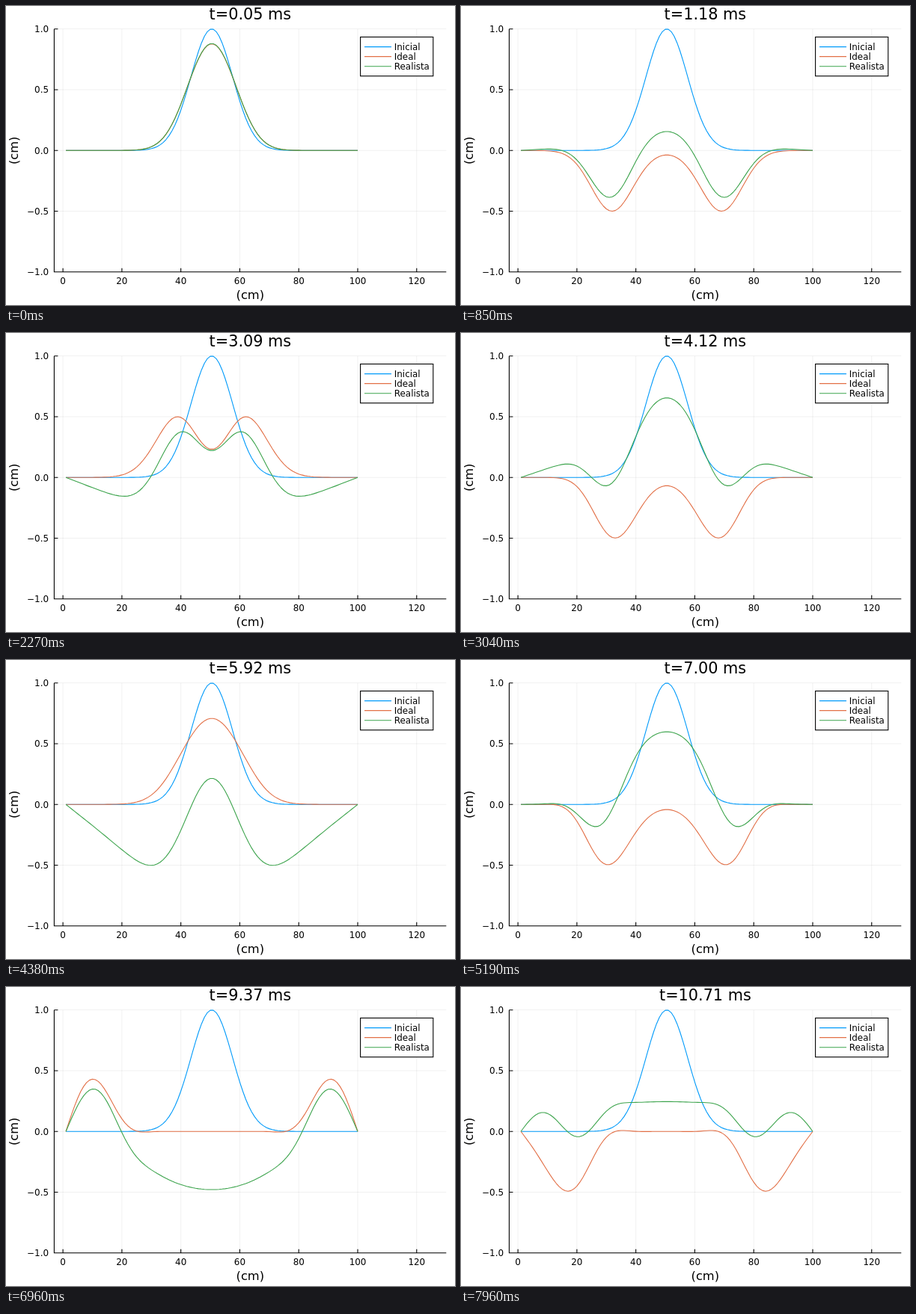
An HTML page for the animation above (8000 ms loop, 600 px wide and 400 px high).

```html
<!DOCTYPE html>
<html lang="es">
<head>
<meta charset="utf-8">
<title>Cuerda vibrante</title>
<style>
html, body { margin: 0; width: 100%; height: 100%; overflow: hidden; background: #fff; }
svg { display: block; width: 600px; height: 400px; }
text { font: 11.9px "DejaVu Sans", sans-serif; fill: #000; }
.title { font-size: 20.8px; }
.label { font-size: 16.3px; }
.mid { text-anchor: middle; }
.end { text-anchor: end; }
path, rect { fill: none; stroke: #000; stroke-width: 1.1; }
#grid { stroke-opacity: .1; stroke-width: .6; }
.box { fill: #fff; }
.curve { stroke-linejoin: round; }
</style>
</head>
<body>
<svg id="plot" viewBox="0 0 600 400"></svg>
<script>
const LOOP = 8000, FRAMES = 208, FRAME_RATE = 0.026;
const POINTS = 100, STEPS = 14, COURANT = 0.25, LOSS = 2.5e-5;
const STEP_MS = 10 / (4 * 680);
const LEFT = 64.4, RIGHT = 588.3, TOP = 30.7, BOTTOM = 355.8;
const SERIES = [['Inicial', '#009afa'], ['Ideal', '#e26f46'], ['Realista', '#3da44d']];

const plot = document.getElementById('plot');
const px = x => 76.1 + x * 3.939;
const py = y => 193.25 - y * 162.55;

function add(tag, attrs, content = '') {
  const node = document.createElementNS('http://www.w3.org/2000/svg', tag);
  for (const key in attrs) node.setAttribute(key, attrs[key]);
  node.textContent = content;
  return plot.appendChild(node);
}

function drawAxes() {
  let grid = '', axes = `M${LEFT} ${TOP}V${BOTTOM}H${RIGHT}`;
  for (let x = 0; x <= 120; x += 20) {
    grid += `M${px(x)} ${TOP}V${BOTTOM}`;
    axes += `M${px(x)} ${BOTTOM}v-5`;
    add('text', { x: px(x), y: 371.7, class: 'mid' }, x);
  }
  for (let y = -1; y <= 1; y += 0.5) {
    grid += `M${LEFT} ${py(y)}H${RIGHT}`;
    axes += `M${LEFT} ${py(y)}h5`;
    add('text', { x: 57, y: py(y) + 4.3, class: 'end' }, y.toFixed(1).replace('-', '\u2212'));
  }
  add('path', { id: 'grid', d: grid });
  add('path', { d: axes });
  add('text', { x: 326.3, y: 392, class: 'label mid' }, '(cm)');
  add('text', { transform: 'translate(16 193.3) rotate(-90)', class: 'label mid' }, '(cm)');
}

function drawLegend() {
  add('rect', { x: 473.6, y: 41.5, width: 97.2, height: 52.2, class: 'box' });
  SERIES.forEach(([name, color], i) => {
    const y = 54.6 + i * 13.05;
    add('path', { d: `M479 ${y}H515`, style: `stroke:${color}` });
    add('text', { x: 518.8, y: y + 4.3 }, name);
  });
}

const pulse = Array.from({ length: POINTS }, (_, i) =>
  i % (POINTS - 1) ? Math.exp(-0.01 * (i + 1 - 50.5) ** 2) : 0);

const toPath = wave =>
  'M' + wave.map((y, i) => px(i + 1).toFixed(2) + ' ' + py(y).toFixed(2)).join('L');

// Finite-difference string with fixed ends, starting from rest.
function simulate(loss) {
  let before = pulse, now = pulse;
  return Array.from({ length: FRAMES }, () => {
    for (let s = 0; s < STEPS; s++) {
      const next = now.map((y, i) => i % (POINTS - 1)
        ? 2 * y - (1 - loss) * before[i] + COURANT ** 2 * (now[i + 1] - 2 * y + now[i - 1])
        : 0);
      before = now;
      now = next;
    }
    return toPath(now);
  });
}

drawAxes();
const curves = SERIES.map(([, color]) => add('path', { class: 'curve', style: `stroke:${color}` }));
curves[0].setAttribute('d', toPath(pulse));
drawLegend();
const title = add('text', { x: 326.4, y: 18, class: 'title mid' });
const ideal = simulate(0), real = simulate(LOSS);

let shown = -1;
function show(frame) {
  if (frame === shown) return;
  shown = frame;
  curves[1].setAttribute('d', ideal[frame]);
  curves[2].setAttribute('d', real[frame]);
  title.textContent = `t=${((frame + 1) * STEPS * STEP_MS).toFixed(2)} ms`;
}

const start = performance.now();
function tick() {
  const time = (performance.now() - start) % LOOP;
  show(Math.min(FRAMES - 1, Math.floor((time + 5) * FRAME_RATE)));
  requestAnimationFrame(tick);
}
tick();
</script>
</body>
</html>
```
